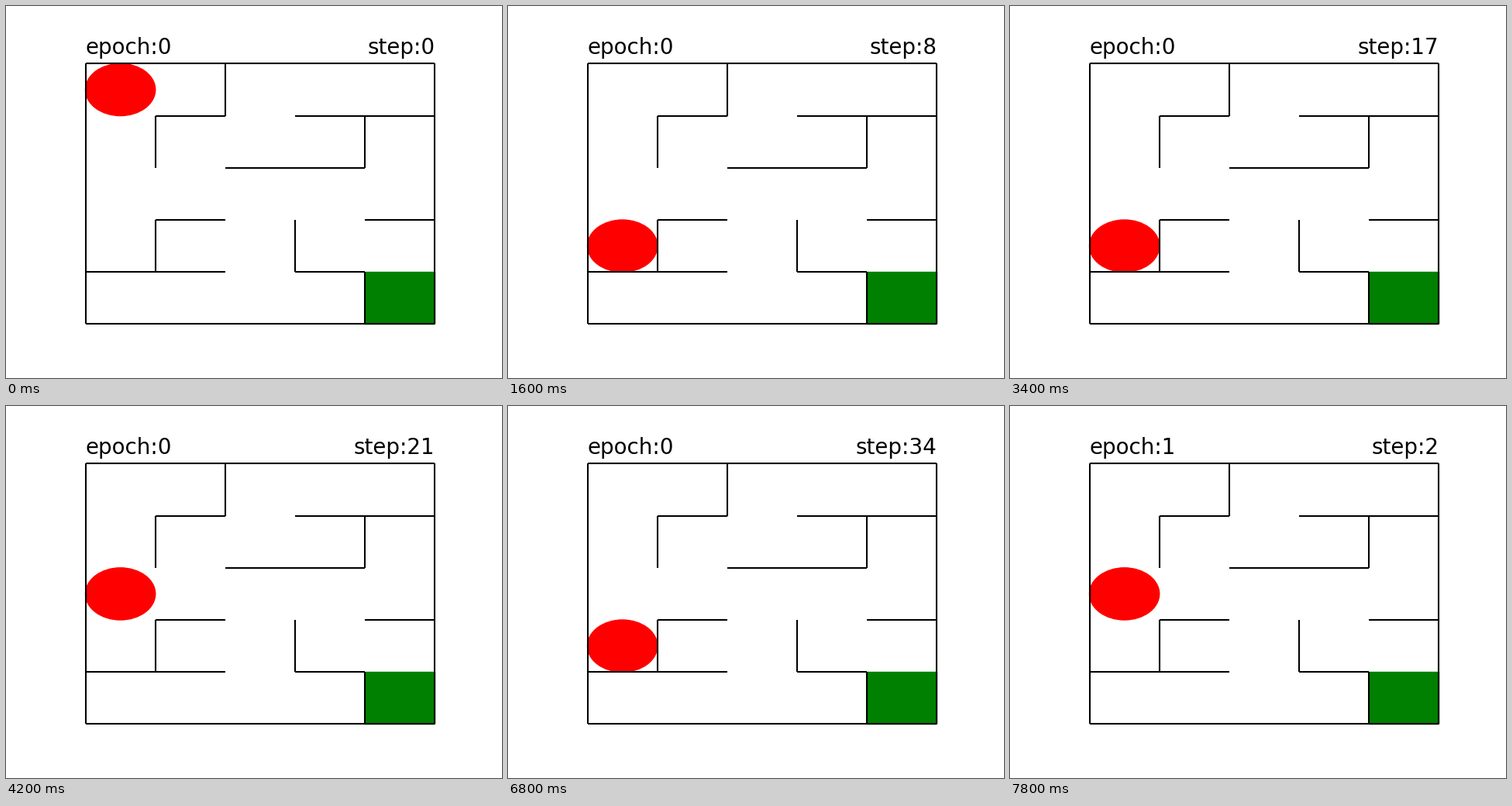
A matplotlib script that plays this animation: 640x480 px, repeating every 8 s.

```python
import matplotlib.pyplot as plt
from matplotlib.animation import FuncAnimation
from matplotlib.collections import LineCollection
from matplotlib.patches import Circle, Rectangle

SIZE = 5
FRAMES = 40
STEP_MS = 200
EPOCH_STEPS = 37    # steps before the walker is sent back to the start
DEAD_END = 3        # lowest row the walker can reach
SETTLED = 24        # from this step on it no longer tries to back out
RETRY = 9           # steps between tries

MOVES = {"R": (1, 0), "L": (-1, 0), "D": (0, 1), "U": (0, -1)}

# Each wall: a starting corner, then unit strokes
WALLS = {
    (0, 0): "R" * SIZE + "D" * SIZE + "L" * SIZE + "U" * SIZE,
    (2, 0): "DLD",
    (5, 1): "LL",
    (4, 1): "DLL",
    (2, 3): "LD",
    (5, 3): "L",
    (3, 3): "DRD",
    (0, 4): "RR",
}


def strokes(start, path):
    x, y = start
    for move in path:
        dx, dy = MOVES[move]
        yield [(x, y), (x + dx, y + dy)]
        x, y = x + dx, y + dy


fig = plt.figure(figsize=(6.4, 4.8), dpi=100, facecolor="white")
ax = fig.add_axes([0.125, 0.11, 0.775, 0.77])
ax.set_xlim(-0.25, SIZE + 0.25)
ax.set_ylim(SIZE + 0.25, -0.25)
ax.axis("off")

segments = [s for start, path in WALLS.items() for s in strokes(start, path)]
ax.add_collection(LineCollection(segments, colors="black", linewidths=1.5,
                                 zorder=2), autolim=False)
ax.add_patch(Rectangle((SIZE - 1, SIZE - 1), 1, 1, color="green"))
walker = ax.add_patch(Circle((0.5, 0.5), 0.5, color="red"))

label = dict(y=-0.185, s="", fontsize=20, family="DejaVu Sans", va="baseline")
epoch_text = ax.text(x=0, ha="left", **label)
step_text = ax.text(x=SIZE, ha="right", **label)


def row_at(step):
    backs_out = step < SETTLED and step % RETRY == DEAD_END
    return min(step, DEAD_END) - backs_out


def draw(frame):
    epoch, step = divmod(frame, EPOCH_STEPS)
    walker.center = (0.5, row_at(step) + 0.5)
    epoch_text.set_text(f"epoch:{epoch}")
    step_text.set_text(f"step:{step}")
    return walker, epoch_text, step_text


anim = FuncAnimation(fig, draw, frames=FRAMES, init_func=lambda: draw(0),
                     interval=STEP_MS, repeat=True, repeat_delay=0)
plt.show()
```
